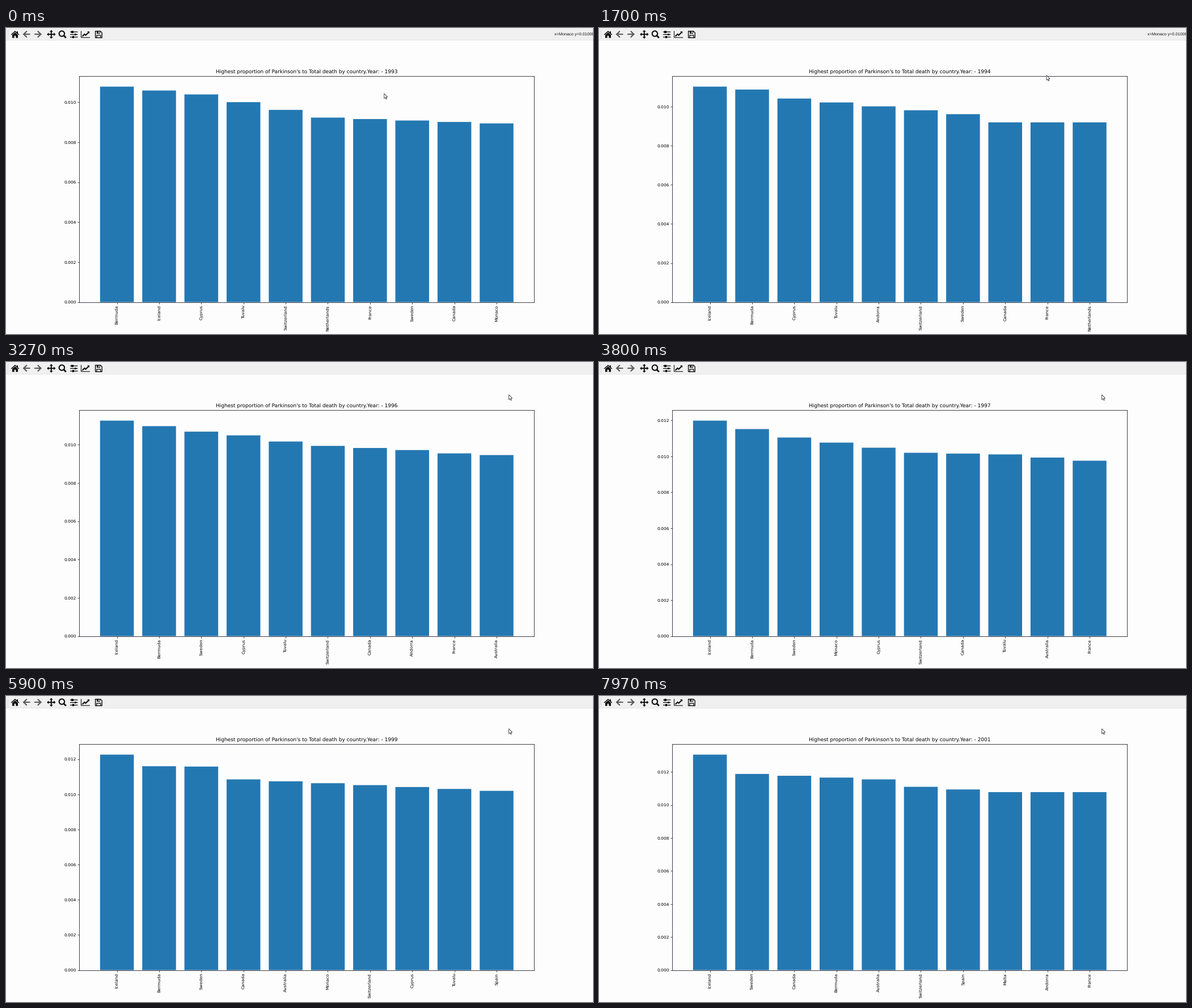
Animation, 1035 px wide and 541 px high, one loop 8 s. Source, as a matplotlib script:

```python
import matplotlib as mpl
import matplotlib.pyplot as plt
import numpy as np
from matplotlib.animation import FuncAnimation
from matplotlib.patches import Circle, Polygon, Rectangle

W, H, DPI = 1035, 541, 64
LOOP, STEP = 8000, 25
FIRST_YEAR = 1993
YEAR_MS, LEAD_MS = 1040, 375       # time per year, part of the first year already past
INK, GREY, FRAME = "#0c0c0c", "#5a5a5a", "#1c1c28"
PAPER, BAR = "#fdfdfd", "#2478b2"
PT = 72 / DPI                      # points per pixel
UI = 53.9 / DPI                    # chart scale relative to default sizes

mpl.rcParams.update({"font.family": "DejaVu Sans", "text.hinting": "none",
                     "toolbar": "None"})

# Ranking of each year, highest first
RANKING = [names.split() for names in (
    "Bermuda Iceland Cyprus Tuvalu Switzerland Netherlands France Sweden Canada Monaco",
    "Iceland Bermuda Cyprus Tuvalu Andorra Switzerland Sweden Canada France Netherlands",
    "Cyprus Iceland Tuvalu Sweden Switzerland Andorra Canada France Australia Spain",
    "Iceland Bermuda Sweden Cyprus Tuvalu Switzerland Canada Andorra France Australia",
    "Iceland Bermuda Sweden Monaco Cyprus Switzerland Canada Tuvalu Australia France",
    "Iceland Bermuda Sweden Monaco Canada Cyprus Switzerland Tuvalu Australia Spain",
    "Iceland Bermuda Sweden Canada Australia Monaco Switzerland Cyprus Tuvalu Spain",
    "Iceland Sweden Bermuda Canada Australia Switzerland Monaco Spain Cyprus France",
    "Iceland Sweden Canada Bermuda Australia Switzerland Spain Malta Andorra France",
)]

# Bends of each year's falling curve: rank -> deaths per 1000 deaths
BENDS = {
    1993: {0: 10.78, 2: 10.39, 5: 9.23, 9: 8.94},
    1994: {0: 11.03, 1: 10.88, 2: 10.42, 6: 9.62, 7: 9.2},
    1995: {0: 10.54, 3: 10.22, 4: 9.86, 8: 9.17},
    1997: {0: 11.99, 2: 11.05, 5: 10.2, 7: 10.11, 9: 9.76},
    1998: {0: 12.08, 2: 11.32, 3: 10.66, 8: 10.25, 9: 9.96},
    1999: {0: 12.26, 1: 11.6, 2: 11.58, 3: 10.85, 9: 10.2},
    2001: {0: 13.05, 1: 11.88, 4: 11.55, 5: 11.1, 7: 10.78},
}


def rates(year):
    """Ten rates along the year's bends; a year without bends lies between its neighbours."""
    if year not in BENDS:
        return (rates(year - 1) + rates(year + 1)) / 2
    bends = BENDS[year]
    return np.interp(range(10), list(bends), list(bends.values())) / 1000


fig = plt.figure(figsize=(W / DPI, H / DPI), dpi=DPI, facecolor=PAPER)

# Chart
ax = fig.add_axes([129.4 / W, 56.4 / H, 801.8 / W, 400 / H], facecolor=PAPER)
bars = ax.bar(range(10), np.ones(10), color=BAR, snap=False)
ax.set_xlim(-0.89, 9.89)
ax.set_xticks(range(10), [""] * 10, rotation=90)
ax.set_yticks(np.arange(0, 0.0141, 0.002))
ax.yaxis.set_major_formatter("{x:.3f}")
ax.tick_params(labelsize=10 * UI, length=3.5 * UI, pad=3.5 * UI, width=0.9, color=FRAME)
for spine in ax.spines.values():
    spine.set(linewidth=0.95, edgecolor=FRAME)
title = ax.set_title("", fontsize=12 * UI, pad=6 * UI)

# Pixel-space layer for the toolbar and the pointer
top = fig.add_axes([0, 0, 1, 1], zorder=5)
top.set(xlim=(0, W), ylim=(H, 0))
top.axis("off")


def rect(x, y, w, h, color=INK):
    top.add_patch(Rectangle((x, y), w, h, fc=color, ec="none"))


def poly(points, color=INK):
    top.add_patch(Polygon(points, fc=color, ec="none"))


def line(points, width, color=INK, cap="butt"):
    x, y = zip(*points)
    top.plot(x, y, color=color, lw=width * PT, solid_capstyle=cap,
             solid_joinstyle="miter", snap=False)


def home():
    line([(9.2, 12), (16, 5.9), (22.8, 12)], 1.5)
    rect(19, 5.5, 1.8, 4)
    poly([(11, 12.3), (16, 7.9), (21, 12.3), (21, 17.5), (17.4, 17.5),
          (17.4, 13.6), (14.6, 13.6), (14.6, 17.5), (11, 17.5)])


def arrow(tip, d):
    line([(tip + d, 11), (tip + 11.5 * d, 11)], 2.1, GREY, "round")
    line([(tip + 6 * d, 6.1), (tip + d, 11), (tip + 6 * d, 15.9)], 2.2, GREY, "round")


def pan(cx, cy):
    for dx, dy in ((1, 0), (-1, 0), (0, 1), (0, -1)):
        line([(cx, cy), (cx + 5.5 * dx, cy + 5.5 * dy)], 2)
        poly([(cx + 7.7 * dx, cy + 7.7 * dy),
              (cx + 4.5 * dx + 3 * dy, cy + 4.5 * dy + 3 * dx),
              (cx + 4.5 * dx - 3 * dy, cy + 4.5 * dy - 3 * dx)])


def zoom():
    top.add_patch(Circle((98.4, 10), 4.7, fc="none", ec=INK, lw=2.1 * PT))
    line([(101.6, 13.2), (105.8, 17.4)], 2.8)


def sliders():
    for row, knob in enumerate((117, 122.6, 118.2)):
        y = 6.9 + 4.6 * row
        line([(113, y), (126.4, y)], 1.3)
        rect(knob - 1.7, y - 1.7, 3.4, 3.4)


def plot_options():
    line([(132.5, 5.3), (132.5, 16.8), (148, 16.8)], 1.1)
    line([(134.5, 14.8), (138.5, 10.9), (140.5, 12.7), (144.9, 8.4)], 2.1)
    poly([(143.2, 6.2), (147.1, 6.2), (147.1, 10.1)])


def save():
    line([(157.6, 5.6), (166.5, 5.6), (169.2, 8.3), (169.2, 17.2), (157.6, 17.2),
          (157.6, 5)], 1.4)
    rect(159.6, 5.5, 6.2, 4.4)
    rect(163, 6.3, 1.6, 2.6, "#f0f0f0")
    line([(160, 17), (160, 12.7), (166.8, 12.7), (166.8, 17)], 1.3)


rect(0, 0, W, 21.5, "#f0f0f0")
rect(0, 21, W, 1, "#e4e4e4")
rect(3, 3, 1, 16, "#d8d8d8")
home()
arrow(30.2, 1)
arrow(62.4, -1)
pan(79.8, 11.2)
zoom()
sliders()
plot_options()
save()
readout = top.text(967, 11.2, "x=Monaco y=0.01008", fontsize=7.2 * PT, va="center_baseline",
                   family="Liberation Sans", color="#111111")

POINTER = np.array([(0, 0), (0, 8.8), (2, 7), (3.5, 10), (4.8, 9.4), (3.4, 6.5), (6, 6.3)])
START, END = np.array([666.7, 115.8]), np.array([886.6, 57.8])
pointer = top.add_patch(Polygon(POINTER, fc="white", ec="#3c3c46", lw=0.9 * PT))


def ease(t, begin, end):
    u = min(max((t - begin) / (end - begin), 0), 1)
    return u * u * (3 - 2 * u)


def update(i):
    t = i * STEP
    index = (t + LEAD_MS) // YEAR_MS
    year = FIRST_YEAR + index
    heights = rates(year)
    for bar, height in zip(bars, heights):
        bar.set_height(height)
    ax.set_ylim(0, heights[0] * 1.05)
    ax.set_xticklabels(RANKING[index])
    title.set_text(f"Highest proportion of Parkinson's to Total death by country.Year: - {year}")
    readout.set_visible(index < 2)
    pointer.set_xy(POINTER + START + (END - START) * ease(t, 1270, 2070))
    return [*bars, title, readout, pointer]


anim = FuncAnimation(fig, update, frames=LOOP // STEP, interval=STEP, repeat=True)
plt.show()
```
